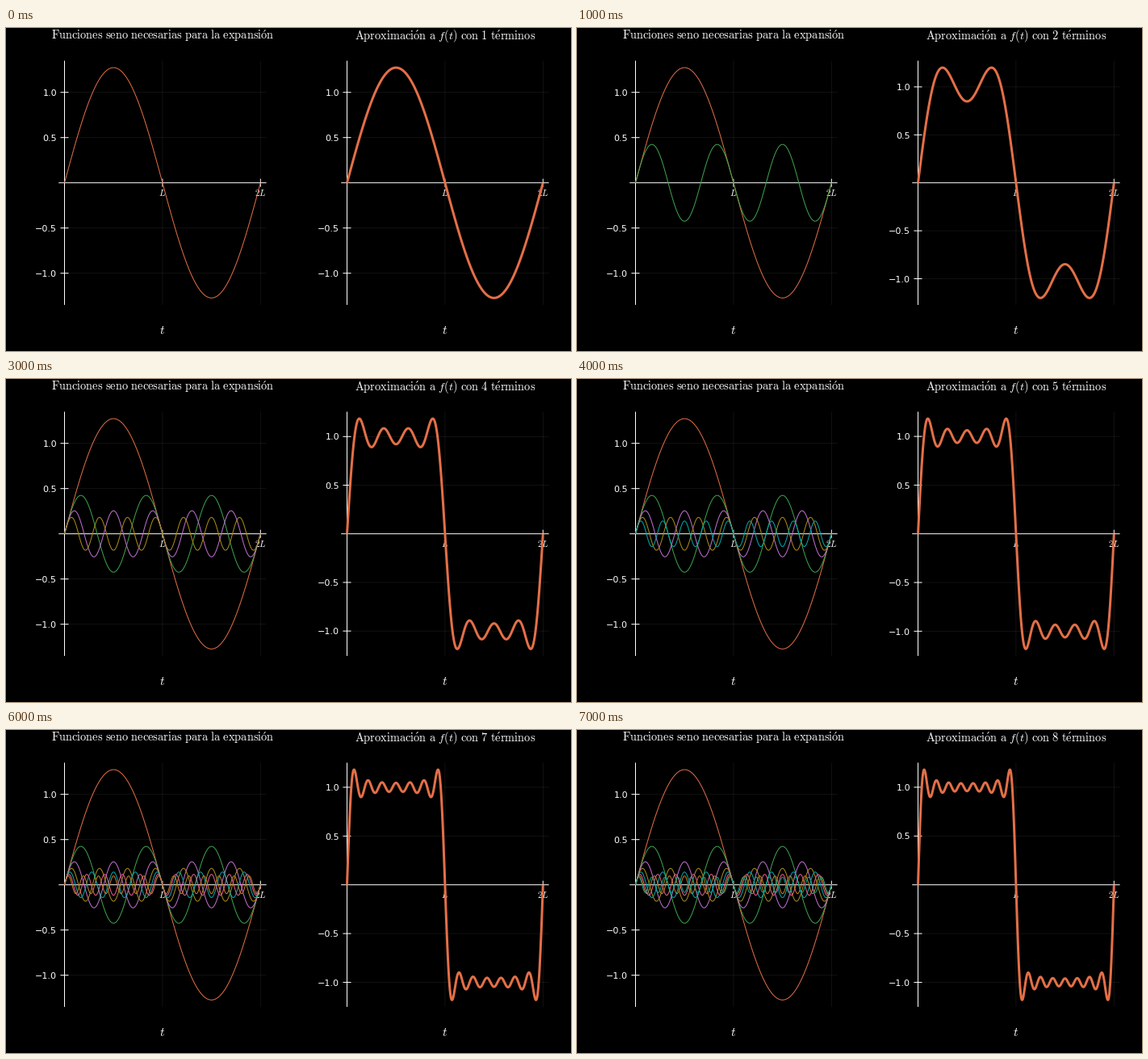
Write a matplotlib script that moves like this. It is 700x400 px and loops after 8 s.

```python
import numpy as np
import matplotlib.pyplot as plt
from matplotlib.animation import FuncAnimation

plt.rcParams["mathtext.fontset"] = "cm"
plt.rcParams["font.family"] = "DejaVu Sans"
plt.rcParams["path.simplify"] = False

W, H = 700, 400
TERMS = 8
COLORS = ["#e36f47", "#3ea44e", "#c371d2", "#ac8e18",
          "#00aaae", "#ed5e93", "#c68225", "#00a98d"]
LEFT, RIGHT = 72.5, 422.5      # x of t = 0 in each panel
SPAN = 242.8                   # pixels from 0 to 2L
ZERO, PEAK = 191.7, 142.6      # y of the axis and height of the largest value
PAD_X, PAD_Y = 7.3, 151.2
TICKS = (1.0, 0.5, -0.5, -1.0)

# At 72 dpi one point is one pixel, so all sizes below are pixels.
fig = plt.figure(figsize=(W / 72, H / 72), dpi=72, facecolor="black")
ax = fig.add_axes([0, 0, 1, 1])
ax.set_xlim(0, W)
ax.set_ylim(H, 0)
ax.axis("off")

t = np.linspace(0, 2, 1500)    # in units of L
waves = [4 / (np.pi * k) * np.sin(k * np.pi * t) for k in range(1, 2 * TERMS, 2)]


def line(x, y, color="white", lw=1.0, z=2, alpha=1):
    return ax.plot(x, y, color=color, lw=lw, zorder=z, alpha=alpha, snap=False,
                   solid_capstyle="butt", solid_joinstyle="round")[0]


def text(x, y, s, size, ha="center", va="baseline"):
    return ax.text(x, y, s, size=size, color="white", ha=ha, va=va, zorder=3)


def words(s):
    return r"\mathrm{" + s.replace(" ", r"\ ") + "}"


def panel(x0):
    """Draw the fixed parts; return the movable y ticks as (grid, mark, label)."""
    x1 = x0 + SPAN
    ends = [x0 - PAD_X, x1 + PAD_X]
    sides = [ZERO - PAD_Y, ZERO + PAD_Y]
    line(ends, [ZERO, ZERO])
    line([x0, x0], sides)
    for x, name in ((x0 + SPAN / 2, "$L$"), (x1, "$2L$")):
        line([x, x], sides, lw=0.8, z=1, alpha=0.09)
        line([x, x], [ZERO - 5, ZERO + 5])
        text(x - 0.3, 208, name, 11.1)
    text(x0 + SPAN / 2, 379, "$t$", 15.3)
    marks = []
    for v in TICKS:
        label = f"{v:.1f}".replace("-", "\u2212")
        marks.append((line(ends, [0, 0], lw=0.8, z=1, alpha=0.09),
                      line([x0 - 5, x0 + 5], [0, 0]),
                      text(x0 - 9.5, 0, label, 11.1, "right")))
    return marks


def place_ticks(marks, scale):
    for v, (grid, mark, label) in zip(TICKS, marks):
        y = ZERO - v * scale
        grid.set_ydata([y, y])
        mark.set_ydata([y, y])
        label.set_y(y + 4.2)


left_scale = PEAK / waves[0].max()
place_ticks(panel(LEFT), left_scale)
right_marks = panel(RIGHT)

text(LEFT + SPAN / 2, 14, "$" + words("Funciones seno necesarias para la expansi")
     + r"\acute{\mathrm{o}}\mathrm{n}$", 14.4)
title = text(RIGHT + SPAN / 2, 14, "", 14.4)

sines = [line(LEFT + t * SPAN / 2, ZERO - w * left_scale, c, 1.0, 5 + i)
         for i, (w, c) in enumerate(zip(waves, COLORS))]
total = line(RIGHT + t * SPAN / 2, 0 * t, COLORS[0], 3.0, 5)


def update(i):
    n = i + 1
    for k, sine in enumerate(sines):
        sine.set_visible(k < n)
    f = sum(waves[:n])
    scale = PEAK / f.max()
    total.set_ydata(ZERO - f * scale)
    place_ticks(right_marks, scale)
    title.set_text("$" + words("Aproximaci") + r"\acute{\mathrm{o}}"
                   + words("n a ") + "f(t)" + words(f" con {n} t")
                   + r"\acute{\mathrm{e}}" + words("rminos") + "$")
    return [total, title, *sines]


anim = FuncAnimation(fig, update, frames=TERMS, interval=1000, repeat=True, blit=False)
plt.show()
```
